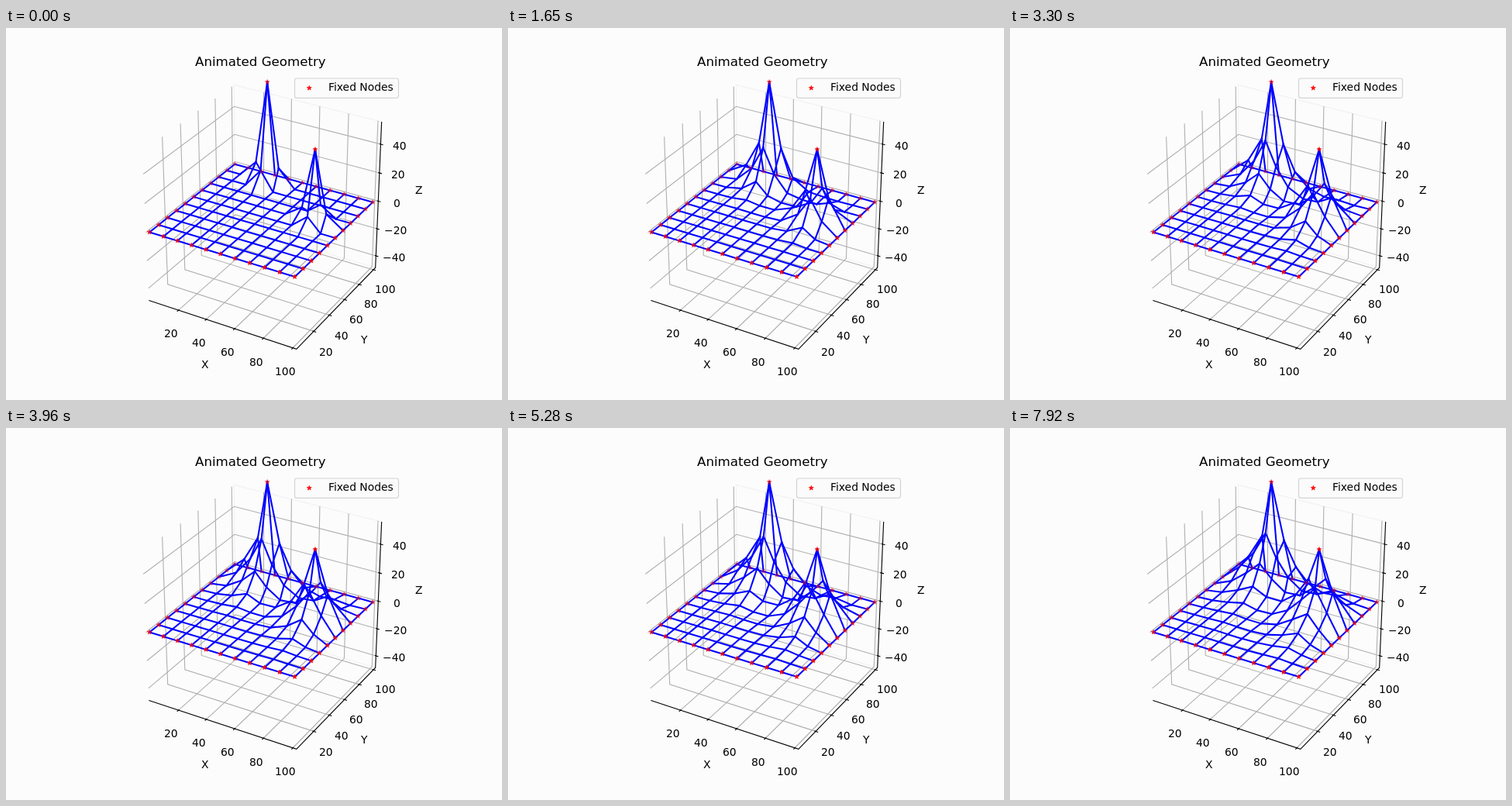
An HTML page with a canvas for the animation above (8000 ms loop, 640x480 px).

```html
<!DOCTYPE html>
<html>
<head>
<meta charset="utf-8">
<style>
html, body { margin: 0; width: 100%; height: 100%; overflow: hidden; background: #fcfcfc; }
canvas { display: block; }
</style>
</head>
<body>
<canvas id="stage" width="640" height="480"></canvas>
<script>
const ctx = document.getElementById('stage').getContext('2d');
const LOOP = 8000, STEP = 330, COUNT = 11, SPACING = 10, STIFFNESS = 0.2;
const UNIT = 1.05624 / 100;               // world units per data unit
const CENTER = [50.35, 50.8, 3.2];        // data point in the middle of the box
const EDGE = 0.55013;                     // half size of the drawn box
const PEAKS = [[3, 9, 70], [8, 6, 50]];
const TICKS = [20, 40, 60, 80, 100], Z_TICKS = [-40, -20, 0, 20, 40];
const FONT = '"DejaVu Sans", sans-serif';

// --- Projection: elevation 30 deg, azimuth -60 deg, eye distance 10 ---
const worldOn = (axis, value) => (value - CENTER[axis]) * UNIT;
const toWorld = p => p.map((value, axis) => worldOn(axis, value));
const nearness = ([x, y, z]) => 0.4330127 * x - 0.75 * y + 0.5 * z;
function project(p) {
  const scale = 1997.84 / (10 - nearness(p));
  return [333 + scale * (0.8660254 * p[0] + 0.5 * p[1]),
          237.4 - scale * (-0.25 * p[0] + 0.4330127 * p[1] + 0.8660254 * p[2])];
}

// --- Spring net relaxing towards its fixed nodes ---
const indexOf = (i, j) => i * COUNT + j;
const nodes = [], fixed = [], links = [];
for (let i = 0; i < COUNT; i++) {
  for (let j = 0; j < COUNT; j++) {
    const peak = PEAKS.find(([a, b]) => a === i && b === j);
    nodes.push([i * SPACING, j * SPACING, peak ? peak[2] : 0]);
    fixed.push(!!peak || i % (COUNT - 1) === 0 || j % (COUNT - 1) === 0);
    if (i) links.push([indexOf(i - 1, j), indexOf(i, j)]);
    if (j) links.push([indexOf(i, j - 1), indexOf(i, j)]);
  }
}

function relax(state) {
  const next = state.map(p => p.slice());
  for (const [a, b] of links) {
    const d = state[b].map((v, k) => v - state[a][k]);
    const length = Math.hypot(...d);
    const pull = STIFFNESS * (length - SPACING) / length;
    for (let k = 0; k < 3; k++) {
      if (!fixed[a]) next[a][k] += pull * d[k];
      if (!fixed[b]) next[b][k] -= pull * d[k];
    }
  }
  return next;
}

const states = [relax(nodes)];
while (states.length < Math.ceil(LOOP / STEP)) states.push(relax(states[states.length - 1]));

// --- Drawing helpers ---
function line(points, color, width) {
  ctx.beginPath();
  points.forEach(p => ctx.lineTo(...project(p)));
  ctx.strokeStyle = color;
  ctx.lineWidth = width;
  ctx.stroke();
}

function star(x, y, alpha) {
  ctx.beginPath();
  for (let k = 0; k < 10; k++) {
    const r = k % 2 ? 1.19 : 3.1, a = k * Math.PI / 5;
    ctx.lineTo(x + r * Math.sin(a), y - r * Math.cos(a));
  }
  ctx.closePath();
  ctx.globalAlpha = alpha;
  ctx.fillStyle = ctx.strokeStyle = '#f00';
  ctx.lineWidth = 0.75;
  ctx.fill();
  ctx.stroke();
  ctx.globalAlpha = 1;
}

// Centred on x, snapped to whole pixels.
function text(str, x, baseline, size = 13.89) {
  ctx.font = `${size}px ${FONT}`;
  ctx.fillStyle = '#000';
  ctx.fillText(str, Math.round(x - ctx.measureText(str).width / 2), Math.round(baseline));
}

function label(str, point, drop) {
  const [x, y] = project(point);
  text(String(str).replace('-', '\u2212'), x, y + drop);
}

function drawAxes() {
  const E = EDGE, IN = E - 0.0088, OUT = E + 0.0176;
  const grid = points => line(points, '#b0b0b0', 1.11);
  const black = points => line(points, '#000', 1.11);

  line([[-E, E, -E], [E, E, -E], [E, E, E], [-E, E, E], [-E, E, -E]], '#f2f2f2', 1.2);
  for (const t of TICKS) {
    const x = worldOn(0, t), y = worldOn(1, t);
    grid([[x, -E, -E], [x, E, -E], [x, E, E]]);
    grid([[E, y, -E], [-E, y, -E], [-E, y, E]]);
  }
  for (const t of Z_TICKS) {
    const z = worldOn(2, t);
    grid([[-E, -E, z], [-E, E, z], [E, E, z]]);
  }
  black([[-E, -E, -E], [E, -E, -E], [E, E, -E], [E, E, E]]);
  for (const t of TICKS) {
    const x = worldOn(0, t), y = worldOn(1, t);
    black([[x, -IN, -E], [x, -OUT, -E]]);
    black([[IN, y, -E], [OUT, y, -E]]);
  }
  for (const t of Z_TICKS) {
    const z = worldOn(2, t);
    black([[IN, E, z], [OUT, E, z]]);
  }
}

function drawLabels() {
  const T = EDGE + 0.0913, N = EDGE + 0.1985;   // distance of tick labels and axis names
  for (const t of TICKS) {
    label(t, [worldOn(0, t), -T, -T], 10.6);
    label(t, [T, worldOn(1, t), -T], 10.6);
  }
  for (const t of Z_TICKS) label(t, [T, T, worldOn(2, t)], 10.6);
  label('X', [0, -N, -N], 3.8);
  label('Y', [N, 0, -N], 3.8);
  label('Z', [N, N, 0], 3.8);
  text('Animated Geometry', 328, 49, 16.67);
}

function drawLegend() {
  ctx.beginPath();
  ctx.roundRect(372.5, 65, 134, 25.3, 2.8);
  ctx.fillStyle = 'rgba(252,252,252,0.8)';
  ctx.fill();
  ctx.strokeStyle = '#d4d4d4';
  ctx.lineWidth = 1.2;
  ctx.stroke();
  star(391.3, 77.5, 1);
  text('Fixed Nodes', 458, 81);
}

function drawNet(state) {
  const world = state.map(toWorld);
  ctx.lineCap = 'square';
  for (const [a, b] of links) line([world[a], world[b]], '#00f', 2.08);
  ctx.lineCap = 'butt';
  const pinned = world.filter((p, k) => fixed[k]);
  const depths = pinned.map(nearness);
  const near = Math.max(...depths), far = Math.min(...depths);
  pinned.forEach((p, k) => star(...project(p), 1 - 0.7 * (near - depths[k]) / (near - far)));
}

function frame() {
  ctx.fillStyle = '#fcfcfc';
  ctx.fillRect(0, 0, 640, 480);
  drawAxes();
  drawNet(states[Math.floor(performance.now() % LOOP / STEP)]);
  drawLabels();
  drawLegend();
  requestAnimationFrame(frame);
}
frame();
</script>
</body>
</html>
```
